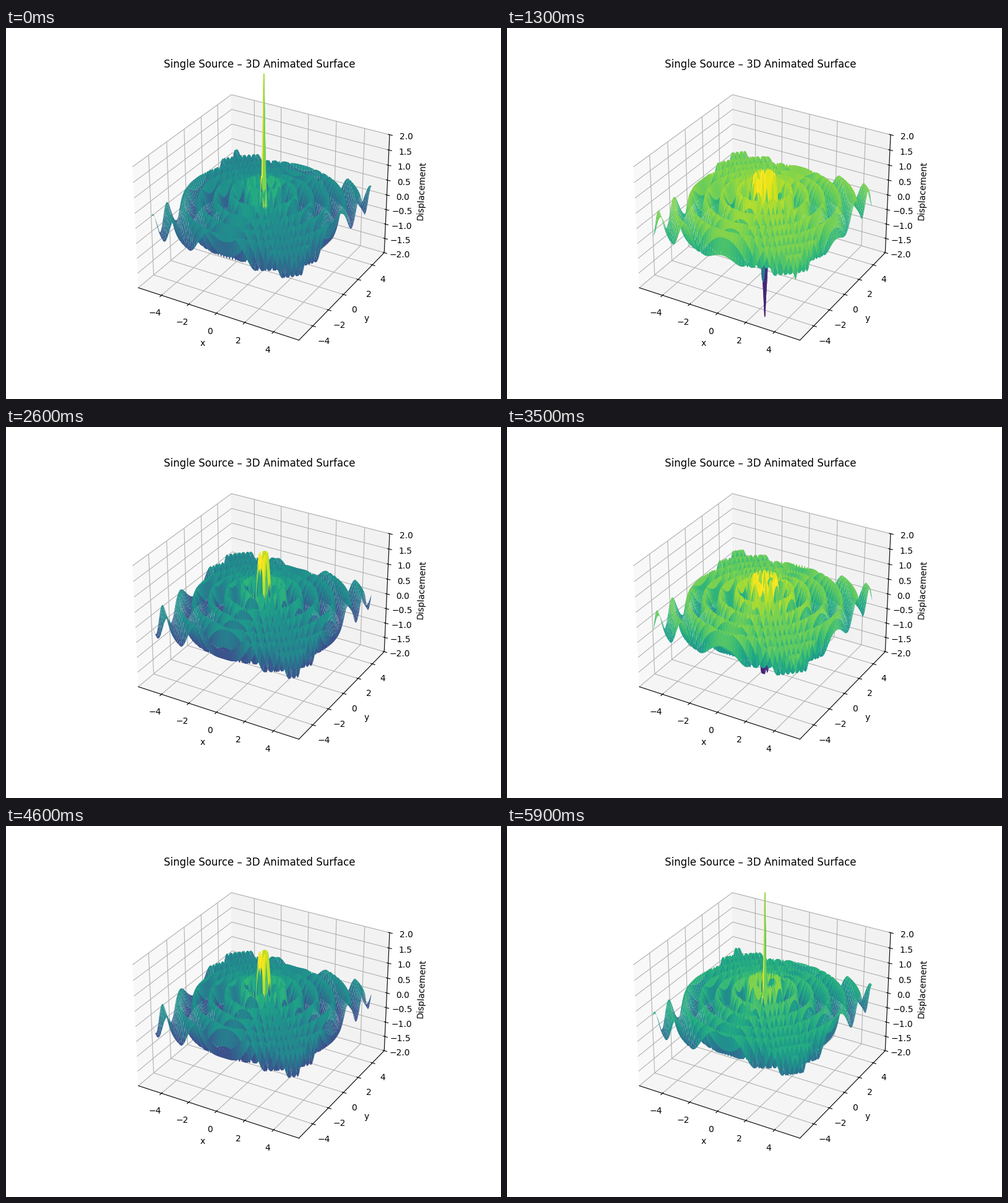
Write a matplotlib script that moves like this. It is 800 px wide and 600 px high and loops after 6 s.

```python
import numpy as np
import matplotlib.pyplot as plt
from matplotlib.animation import FuncAnimation

AMPLITUDE = 1.0
WAVELENGTH = 1.0
STEPS = 20       # frames per wave period
FRAMES = 60
INTERVAL = 100   # ms

axis = np.linspace(-5, 5, 150)
X, Y = np.meshgrid(axis, axis)
R = np.hypot(X, Y)

fig = plt.figure(figsize=(8, 6), dpi=100)
ax = fig.add_subplot(projection="3d")


def displacement(step):
    """Circular wave spreading from the centre, fading with 1/sqrt(r)."""
    phase = 2 * np.pi * (R / WAVELENGTH - step / STEPS)
    return AMPLITUDE / np.sqrt(R) * np.cos(phase)


def make_surface(step):
    surface = ax.plot_surface(X, Y, displacement(step), cmap="viridis",
                              linewidth=0, antialiased=True)
    surface.set_visible(step == 0)
    return surface


surfaces = [make_surface(step) for step in range(STEPS)]

ax.set_zlim(-2, 2)
ax.set_title("Single Source – 3D Animated Surface")
ax.set_xlabel("x")
ax.set_ylabel("y")
ax.set_zlabel("Displacement")


def update(frame):
    for step, surface in enumerate(surfaces):
        surface.set_visible(step == frame % STEPS)
    return surfaces


anim = FuncAnimation(fig, update, frames=FRAMES, interval=INTERVAL,
                     repeat=True, repeat_delay=0, blit=False)
plt.show()
```
